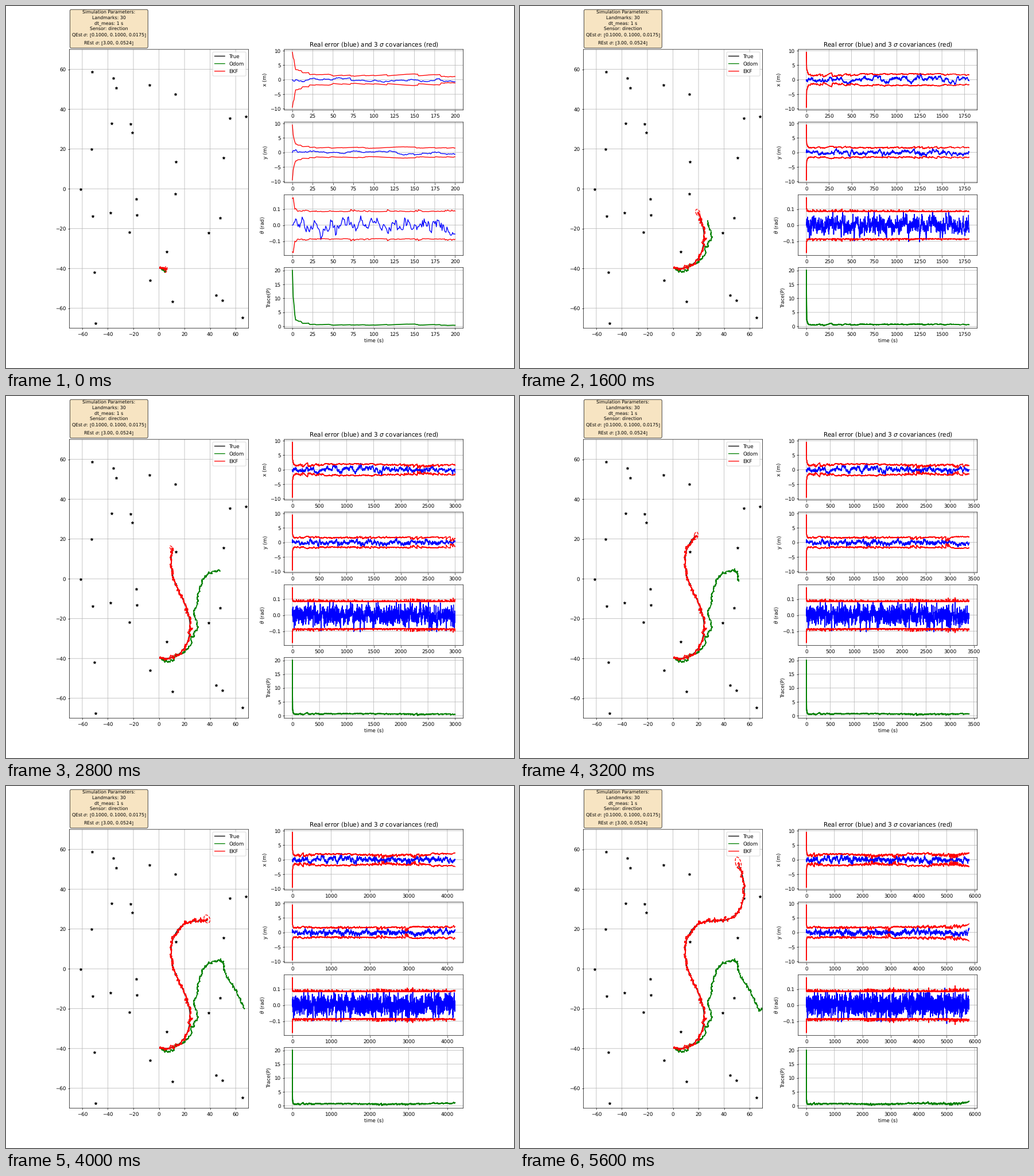
A matplotlib script that plays this animation: 885 by 632 pixels, repeating every 5.8 s.

```python
import numpy as np
import matplotlib.pyplot as plt
from matplotlib.animation import FuncAnimation

DPI = 63.2
FRAMES, INTERVAL, STRIDE = 29, 200, 200
LAYERS = 3
TOTAL = 6000
SEED = 123456

DEG = np.pi / 180
Q = np.diag([0.1, 0.1, DEG]) ** 2
R = np.diag([3.0, 3 * DEG]) ** 2

# Soft, unsnapped rendering keeps sizes true at this low resolution.
plt.rcParams.update({"text.hinting": "none", "path.snap": False})


def wrap(a):
    return (a + np.pi) % (2 * np.pi) - np.pi


def compose(pose, step):
    c, s = np.cos(pose[2]), np.sin(pose[2])
    return np.array([pose[0] + c * step[0] - s * step[1],
                     pose[1] + s * step[0] + c * step[1],
                     wrap(pose[2] + step[2])])


def bearing(pose, mark):
    return np.arctan2(mark[1] - pose[1], mark[0] - pose[0]) - pose[2]


def predict(est, P, u):
    c, s = np.cos(est[2]), np.sin(est[2])
    F = np.array([[1, 0, -s * u[0] - c * u[1]],
                  [0, 1, c * u[0] - s * u[1]],
                  [0, 0, 1]])
    G = np.array([[c, -s, 0], [s, c, 0], [0, 0, 1]])
    return compose(est, u), F @ P @ F.T + G @ Q @ G.T


def correct(est, P, z, mark):
    dx, dy = mark - est[:2]
    d2 = dx * dx + dy * dy
    H = np.array([dy / d2, -dx / d2, -1.0])
    PH = P @ H
    K = PH / (H @ PH + R[1, 1])
    est = est + K * wrap(z - bearing(est, mark))
    est[2] = wrap(est[2])
    P = P - np.outer(K, PH)
    return est, (P + P.T) / 2


def simulate(steps):
    """Bearing-only EKF localisation; returns the landmarks and the history."""
    np.random.seed(SEED)
    marks = 140 * (np.random.rand(2, 30) - 0.5)
    true = np.array([1, -40, -np.pi / 2])
    odom, est = true.copy(), true.copy()
    P = 10 * np.diag([1, 1, DEG ** 2])
    log = [(true, odom, est, P)]
    for k in range(1, steps + 1):
        u = np.array([0, 0.025, 0.1 * DEG * np.sin(3 * np.pi * k / TOTAL)])
        true = compose(true, u)

        np.random.seed(SEED * 2 + k)
        noise = np.sqrt(Q) @ np.random.randn(3)
        odom = compose(compose(odom, u), noise)
        est, P = predict(est, P, u + noise)

        np.random.seed(SEED * 3 + k)
        mark = marks[:, np.random.randint(0, marks.shape[1])]
        z = bearing(true, mark) + (np.sqrt(R) @ np.random.randn(2))[1]
        est, P = correct(est, P, wrap(z), mark)
        log.append((true, odom, est, P))
    return marks, *(np.array(h) for h in zip(*log))


marks, true, odom, est, cov = simulate(FRAMES * STRIDE)
error = est - true
error[:, 2] = wrap(error[:, 2])
bound = 3 * np.sqrt(np.diagonal(cov, axis1=1, axis2=2))
trace = np.trace(cov, axis1=1, axis2=2)
time = np.arange(len(trace))

fig = plt.figure(figsize=(885 / DPI, 632 / DPI), dpi=DPI)
world = fig.add_subplot(1, 2, 1)
plots = [fig.add_subplot(4, 2, i) for i in (2, 4, 6, 8)]
LABELS = ["x (m)", "y (m)", r"$\theta$ (rad)", "Trace(P)"]
INFO = "\n".join(["Simulation Parameters:", "Landmarks: 30", "dt_meas: 1 s",
                  "Sensor: direction",
                  r"QEst $\sigma$: [0.1000, 0.1000, 0.0175]",
                  r"REst $\sigma$: [3.00, 0.0524]"])


def draw_ellipse(n):
    val, vec = np.linalg.eigh(cov[n, :2, :2])
    t = np.arange(0, 2 * np.pi + 0.1, 0.1)
    ring = vec @ (3 * np.sqrt(val)[:, None] * np.array([np.cos(t), np.sin(t)]))
    world.plot(est[n, 0] + ring[0], est[n, 1] + ring[1], "--r")


def draw_world(n):
    world.cla()
    world.plot(*marks, "*k", ms=5.6)
    for path, color, name in ((true, "k", "True"), (odom, "g", "Odom"),
                              (est, "r", "EKF")):
        world.plot(path[:n + 1, 0], path[:n + 1, 1], color, label=name)
    world.plot(est[n, 0], est[n, 1], ".r")
    draw_ellipse(n)
    world.axis([-70, 70, -70, 70])
    world.grid(True)
    world.legend(loc="upper right")
    world.text(0.01, 1.01, INFO, transform=world.transAxes, fontsize=9,
               ha="left", va="bottom", multialignment="center",
               linespacing=1.3,
               bbox=dict(boxstyle="round", facecolor="wheat", alpha=0.8))


def update(frame):
    last = (frame + 1) * STRIDE
    draw_world(last)
    for ax, label in zip(plots, LABELS):
        ax.cla()
        ax.set_ylabel(label)
        ax.grid(True)
    plots[0].set_title(r"Real error (blue) and 3 $\sigma$ covariances (red)")
    plots[3].set_xlabel("time (s)")
    # Curves pile up, so older stretches look heavier.
    first = max(STRIDE, last - (LAYERS - 1) * STRIDE)
    for n in range(first, last + 1, STRIDE):
        t = time[:n + 1]
        for i, ax in enumerate(plots[:3]):
            ax.plot(t, error[:n + 1, i], "b")
            ax.plot(t, bound[:n + 1, i], "r")
            ax.plot(t, -bound[:n + 1, i], "r")
        plots[3].plot(t, trace[:n + 1], "g", lw=2)
    return []


anim = FuncAnimation(fig, update, frames=FRAMES, interval=INTERVAL,
                     init_func=lambda: [], repeat=True, repeat_delay=0)
plt.show()
```
